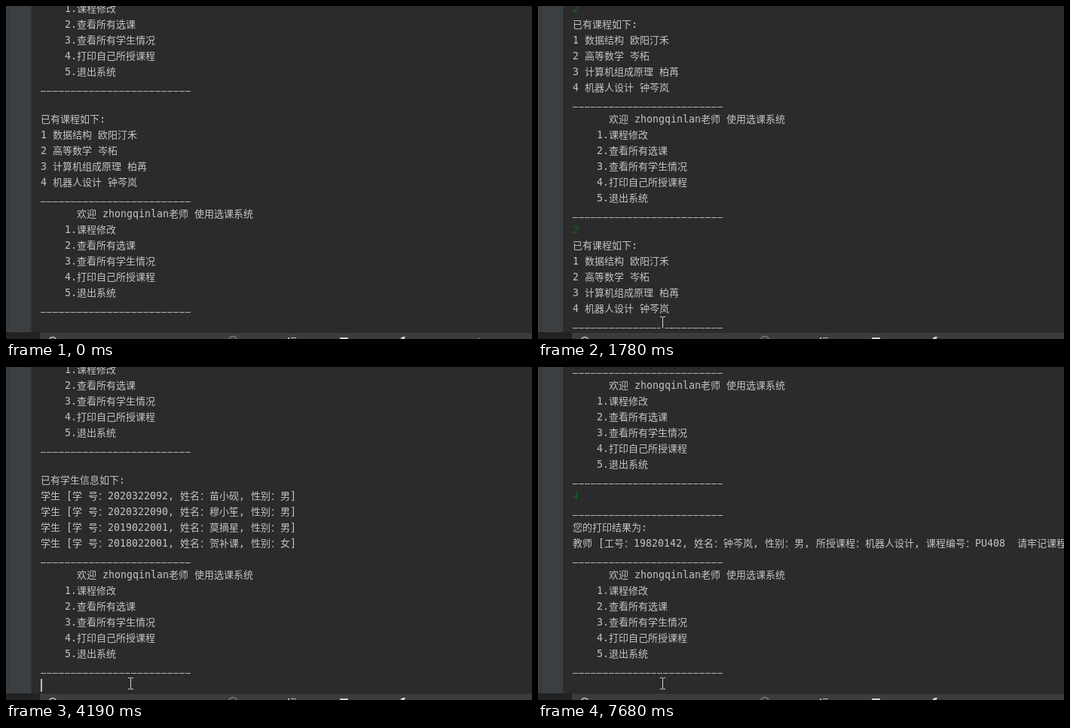
Write an HTML page with a canvas that moves like this. It is 698 px wide and 443 px high and loops after 8 s.

```html
<!DOCTYPE html>
<html lang="zh-CN">
<head>
<meta charset="utf-8">
<title>选课系统</title>
<style>
  html, body { margin: 0; width: 100%; height: 100%; overflow: hidden; background: #2b2b2b; }
  canvas { display: block; }
</style>
</head>
<body>
<canvas id="stage" width="698" height="443"></canvas>
<script>
const ctx = document.getElementById('stage').getContext('2d');
const LOOP = 8000, LEFT = 46, ROW = 21, LAST_ROW = 423;
const LATIN = '13.29px "DejaVu Sans Mono", monospace';
const HAN = '13px "Noto Sans CJK SC", "Noto Sans CJK", sans-serif';

// Console transcript; '>' marks user input, '_' a rule.
const menu = ['_', '      欢迎 zhongqinlan老师 使用选课系统', '    1.课程修改', '    2.查看所有选课',
  '    3.查看所有学生情况', '    4.打印自己所授课程', '    5.退出系统', '_'];
const courses = ['已有课程如下:', '1 数据结构 欧阳汀禾', '2 高等数学 岑柘',
  '3 计算机组成原理 柏苒', '4 机器人设计 钟芩岚'];
const student = (id, name, sex) => `学生 [学 号：${id}, 姓名：${name}, 性别：${sex}]`;
const students = ['已有学生信息如下:', student('2020322092', '苗小砚', '男'),
  student('2020322090', '穆小笙', '男'), student('2019022001', '莫摘星', '男'),
  student('2018022001', '贺补课', '女')];
const report = ['_', '您的打印结果为:',
  '教师 [工号：19820142, 姓名：钟芩岚, 性别：男, 所授课程：机器人设计, 课程编号：PU408  请牢记课程编号]'];

const screens = [];
const log = [...menu, '>2', ...courses, ...menu];
const show = (at, ...lines) => screens.push({ at, lines: [...log, ...lines] });

// One command: typed, entered, answered in two bursts.
function command(key, answer, typed, entered, partial, done) {
  show(typed, '>' + key);
  log.push('>' + key);
  show(entered, '>');
  log.push(...answer);
  show(partial, '_');
  log.push(...menu);
  show(done, '>');
}
show(0, '>');
command('2', courses, 1160, 1550, 1780, 1860);
command('3', students, 2480, 2940, 3180, 3260);
command('4', report, 6210, 6910, 7140, 7220);

const caretOn = [[230, 730], [1160, 1780], [1860, 3180], [3260, 3650],
  [4190, 4650], [5190, 5660], [6130, 7140], [7220, 7680]];

function rect(color, x, y, w, h) {
  ctx.fillStyle = color;
  ctx.fillRect(x, y, w, h);
}

function drawText(text, y) {
  let x = LEFT;
  ctx.fillStyle = '#c4c4c4';
  for (const run of text.match(/[\x20-\x7e]+|[^\x20-\x7e]+/g) || []) {
    const latin = run.charCodeAt(0) < 127;
    ctx.font = latin ? LATIN : HAN;
    ctx.fillText(run, x, y + 5);
    x += run.length * (latin ? 8 : 13);
  }
}

function drawLine(line, y) {
  if (line === '_') {
    for (let i = 0; i < 25; i++) rect('#b4b4b4', LEFT + i * 8, y + 5, 7, 1);
  } else if (line[0] === '>') {
    const dim = y === 129 || y === LAST_ROW;
    ctx.fillStyle = dim ? '#18441b' : '#0f6a18';
    ctx.font = 'italic ' + LATIN;
    ctx.fillText(line.slice(1), LEFT, y + 5);
  } else {
    drawText(line, y);
  }
}

function drawFrame() {
  rect('#2b2b2b', 0, 0, 698, 443);
  rect('#3c3f41', 0, 0, 33, 434);
  rect('#323436', 4, 0, 1, 434);
  rect('#313335', 33, 0, 1, 434);
}

function arc(color, x, y, radius) {
  ctx.strokeStyle = color;
  ctx.lineWidth = 1.5;
  ctx.beginPath();
  ctx.arc(x, y, radius, Math.PI, 0);
  ctx.stroke();
}

function drawTaskbar() {
  rect('#222222', 0, 434, 45, 9);
  rect('#3a3d40', 45, 435, 653, 8);
  arc('#c8c8c8', 62, 445, 4.5);
  arc('#82796f', 301, 445, 5.5);
  rect('#1f2123', 164, 442, 2, 1);
  rect('#b9bcbe', 374, 441, 2, 2);
  rect('#b9bcbe', 378, 441, 7, 1);
  rect('#d2d2d2', 443, 441, 11, 2);
  rect('#d2d2d2', 526, 440, 4, 1);
  rect('#d2d2d2', 524, 441, 5, 2);
}

// The I-beam inverts whatever lies beneath it.
function drawPointer(time) {
  const step = time < 70 ? 0 : Math.min(10, Math.floor((time - 70) / 77.7) + 1);
  const t = step / 10, s = 1 - t;
  const x = Math.round(s * 627 + t * 165);
  const y = Math.round(s * s * 442 + 2 * s * t * 320 + t * t * 421);
  if (y > 434) {
    rect('#e0e0e0', x, y, 1, 1);
    return;
  }
  ctx.globalCompositeOperation = 'difference';
  rect('#ffffff', x, y - 7, 1, 14);
  for (const end of [y - 8, y + 7]) {
    rect('#ffffff', x - 3, end, 3, 1);
    rect('#ffffff', x + 1, end, 3, 1);
  }
  ctx.globalCompositeOperation = 'source-over';
}

function render(time) {
  const { lines } = screens.findLast(s => s.at <= time);
  drawFrame();
  lines.slice(-22).reverse().forEach((line, i) => drawLine(line, LAST_ROW - i * ROW));
  if (caretOn.some(([from, to]) => time >= from && time < to)) {
    const typed = lines.at(-1).length - 1;
    rect('#bbbbbb', LEFT + 7 * typed, 415, 2, 17);
  }
  drawTaskbar();
  drawPointer(time);
}

function tick() {
  render(performance.now() % LOOP);
  requestAnimationFrame(tick);
}
tick();
</script>
</body>
</html>
```
